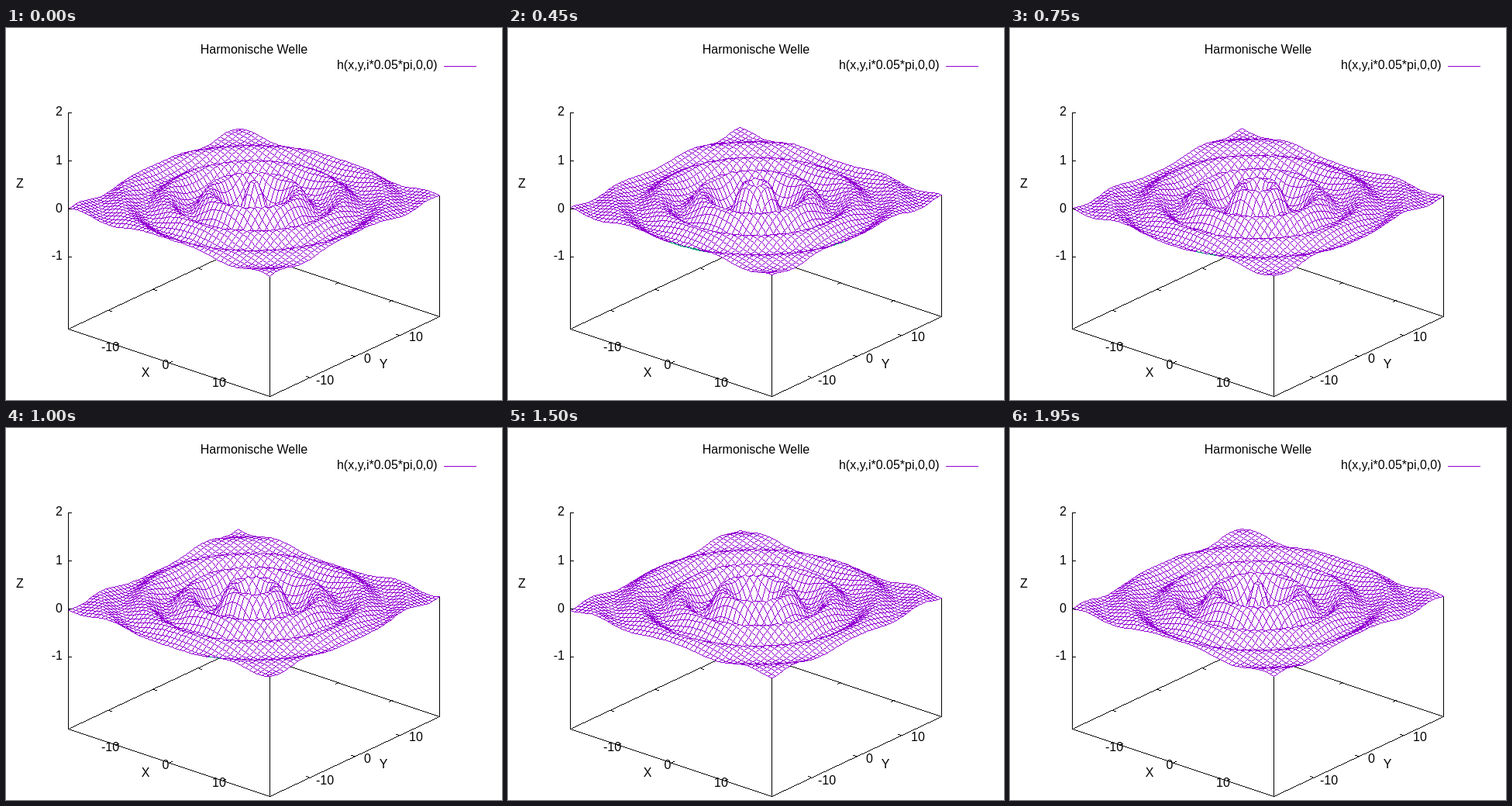
Write an HTML page with a canvas that moves like this. It is 640 px wide and 480 px high and loops after 2 s.

```html
<!DOCTYPE html>
<html lang="de">
<head>
<meta charset="utf-8">
<title>Harmonische Welle</title>
<style>
  html, body { margin: 0; width: 100%; height: 100%; overflow: hidden; background: #fff; }
  canvas, svg { position: absolute; left: 0; top: 0; width: 640px; height: 480px; }
  text { font: 16px "Liberation Sans", Arial, sans-serif; fill: #000; }
  .mid { text-anchor: middle; }
  .end { text-anchor: end; }
</style>
</head>
<body>
<canvas id="plot" width="640" height="480"></canvas>
<svg viewBox="0 0 640 480">
  <text class="mid" x="320" y="33">Harmonische Welle</text>
  <text class="end" x="556.5" y="53">h(x,y,i*0.05*pi,0,0)</text>
  <g class="end">
    <text x="73" y="113">2</text>
    <text x="73" y="176">1</text>
    <text x="73" y="238">0</text>
    <text x="73" y="299">-1</text>
  </g>
  <g class="mid">
    <text x="18" y="206">Z</text>
    <text x="180" y="450">X</text>
    <text x="487" y="439">Y</text>
    <text x="134.5" y="417">-10</text>
    <text x="206" y="440">0</text>
    <text x="275" y="463">10</text>
  </g>
  <text x="400" y="460">-10</text>
  <text x="462" y="432">0</text>
  <text x="520" y="404">10</text>
</svg>
<script>
const W = 640, H = 480, FRAMES = 40, STEP_MS = 50;
const R = 6 * Math.PI, N = 50, BASE = -2.5;
const rgb = (r, g, b) => (255 << 24 | b << 16 | g << 8 | r) >>> 0;
const WHITE = rgb(255, 255, 255), BLACK = rgb(0, 0, 0);
const TOP = rgb(148, 0, 211), UNDER = rgb(0, 158, 115);

const ctx = document.getElementById('plot').getContext('2d');
const image = ctx.createImageData(W, H);
const pixels = new Uint32Array(image.data.buffer);

const wave = (x, y, t) => {
  const r = Math.hypot(x, y);
  return 0.5 * Math.exp(-0.1 * r) * Math.cos(r - t);
};

function project(x, y, z) {
  const u = x / R, v = y / R;
  return [
    Math.round(319.6 + 130.1 * u + 109.3 * v),
    Math.round(225 + 43.4 * u - 51.6 * v - 62 * z)
  ];
}

// Hard-edged line, always stepped in the rising direction of its longer axis.
function line(a, b, color) {
  const main = Math.abs(b[0] - a[0]) >= Math.abs(b[1] - a[1]) ? 0 : 1;
  const side = 1 - main;
  if (a[main] > b[main]) [a, b] = [b, a];
  const length = b[main] - a[main], rise = Math.abs(b[side] - a[side]);
  const step = Math.sign(b[side] - a[side]);
  const p = [...a];
  let err = 2 * rise - length;
  for (; p[main] <= b[main]; p[main]++) {
    pixels[p[1] * W + p[0]] = color;
    if (err >= 0) {
      p[side] += step;
      err -= 2 * length;
    }
    err += 2 * rise;
  }
}

const cross = (a, b, c) => (b[0] - a[0]) * (c[1] - a[1]) - (b[1] - a[1]) * (c[0] - a[0]);

function clearTriangle(a, b, c) {
  const s = Math.sign(cross(a, b, c));
  if (!s) return;
  const xs = [a[0], b[0], c[0]], ys = [a[1], b[1], c[1]];
  const x1 = Math.max(...xs), y1 = Math.max(...ys);
  for (let y = Math.min(...ys); y <= y1; y++) {
    for (let x = Math.min(...xs); x <= x1; x++) {
      const p = [x, y];
      if (s * cross(a, b, p) >= 0 && s * cross(b, c, p) >= 0 && s * cross(c, a, p) >= 0) {
        pixels[y * W + x] = WHITE;
      }
    }
  }
}

function drawQuad(a, b, c, d) {
  clearTriangle(a, b, c);
  clearTriangle(a, c, d);
  const color = cross(a, b, c) + cross(a, c, d) <= 0 ? TOP : UNDER;
  line(a, b, color);
  line(b, c, color);
  line(c, d, color);
  line(d, a, color);
}

function drawFrame(t) {
  const corners = [[-R, -R], [R, -R], [R, R], [-R, R]];
  const floor = corners.map(([x, y]) => project(x, y, BASE));
  floor.forEach((p, i) => line(p, floor[(i + 1) % 4], BLACK));

  const tick = 0.65;
  for (const v of [-10, 0, 10]) {
    for (const s of [-1, 1]) {
      line(project(v, s * R, BASE), project(v, s * (R - tick), BASE), BLACK);
      line(project(s * R, v, BASE), project(s * (R - tick), v, BASE), BLACK);
    }
  }
  for (const [x, y] of corners.slice(1, 3)) {
    line(project(x, y, BASE), project(x, y, wave(x, y, t)), BLACK);
  }

  const at = i => R * (2 * i / (N - 1) - 1);
  const grid = Array.from({ length: N }, (_, i) =>
    Array.from({ length: N }, (_, j) => project(at(i), at(j), wave(at(i), at(j), t))));

  // Back to front: the nearest corner has the largest x and the smallest y.
  for (let j = N - 2; j >= 0; j--) {
    for (let i = 0; i < N - 1; i++) {
      drawQuad(grid[i][j], grid[i + 1][j], grid[i + 1][j + 1], grid[i][j + 1]);
    }
  }

  const axisX = floor[0][0];
  line(floor[0], project(-R, -R, 2), BLACK);
  for (let z = -1; z <= 2; z++) {
    const y = project(-R, -R, z)[1];
    line([axisX, y], [axisX + 4, y], BLACK);
  }
  line([565, 49], [606, 49], TOP);
}

let shown = -1;
function update(now) {
  const frame = Math.floor(now / STEP_MS) % FRAMES;
  if (frame !== shown) {
    shown = frame;
    pixels.fill(WHITE);
    drawFrame((frame + 1) * 0.05 * Math.PI);
    ctx.putImageData(image, 0, 0);
  }
}

const start = performance.now();
function loop() {
  update(performance.now() - start);
  requestAnimationFrame(loop);
}
loop();
</script>
</body>
</html>
```
